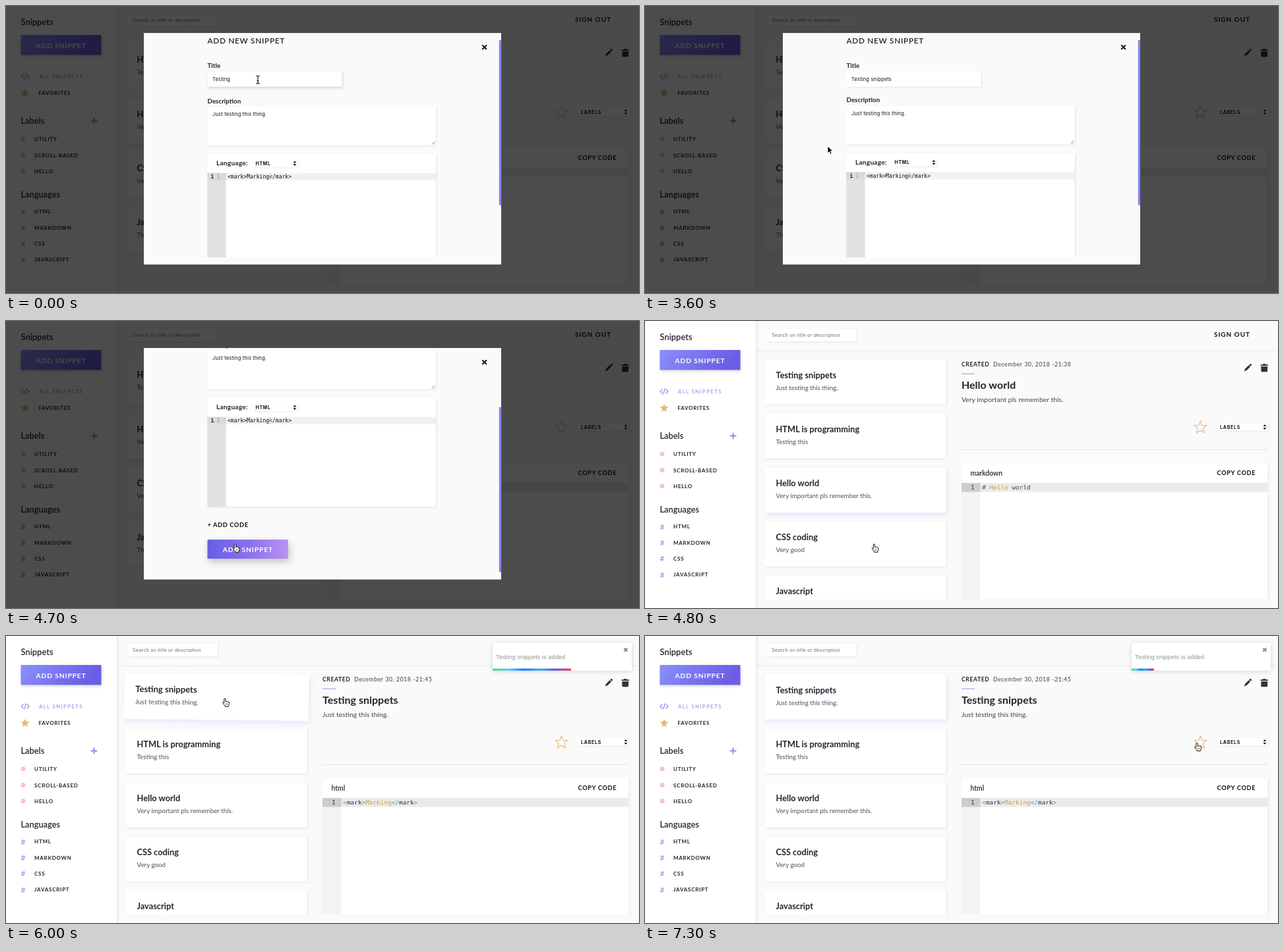
An HTML page for the animation above (7400 ms loop, 960 px wide and 436 px high).

```html
<!DOCTYPE html>
<html lang="en">
<head>
<meta charset="utf-8">
<title>Snippets</title>
<style>
html, body { margin: 0; width: 100%; height: 100%; overflow: hidden; background: #fafafa; }
svg { display: block; width: 100vw; height: 100vh; }
text { font-family: Lato, "Open Sans", sans-serif; white-space: pre; }
.b { font-weight: 700; }
.m { font-weight: 600; }
.ui { font-family: Inter, Roboto, sans-serif; }
.arial { font-family: "Liberation Sans", Arial, sans-serif; }
.code { font-family: "DejaVu Sans Mono", "Noto Sans Mono", monospace; }
.sh { filter: drop-shadow(1px 1.5px 1.5px rgba(0,0,0,.09)); }
.focus { filter: drop-shadow(1px 2px 2px rgba(0,0,0,.16)); }
.picked { filter: drop-shadow(2px 3px 3.5px rgba(120,110,240,.15)); }
.glow { filter: drop-shadow(2px 5px 6px rgba(0,0,0,.22)); }
.side { filter: drop-shadow(1px 0 1.5px rgba(0,0,0,.12)); }
.top { filter: drop-shadow(0 1px 1.5px rgba(0,0,0,.07)); }
.float { filter: drop-shadow(0 1px 3px rgba(0,0,0,.16)); }
</style>
</head>
<body>
<svg id="stage" viewBox="0 0 960 436" xmlns="http://www.w3.org/2000/svg"></svg>
<script>
const LOOP = 7400;
const INK = '#25232f', PURPLE = '#8d88ee', GOLD = '#eab676';
const BLUR = 3450, CLOSE = 4800, PICK = 5900;

const esc = s => s.replace(/&/g, '&amp;').replace(/</g, '&lt;');
const text = (x, y, s, size, cls = '', fill = INK, gap = 0, id = '') =>
  `<text x="${x}" y="${y}" font-size="${size}" class="${cls}" style="fill:${fill};letter-spacing:${gap}px"${id && ` id="${id}"`}>${esc(s)}</text>`;
const rect = (x, y, w, h, fill, more = '') =>
  `<rect x="${x}" y="${y}" width="${w}" height="${h}" fill="${fill}" ${more}/>`;
const path = (d, fill, more = '') => `<path d="${d}" fill="${fill}" ${more}/>`;
const line = (d, stroke, width, more = '') =>
  `<path d="${d}" fill="none" stroke="${stroke}" stroke-width="${width}" ${more}/>`;
const sh = 'class="sh"';

function star(cx, cy, r) {
  const pts = [];
  for (let i = 0; i < 10; i++) {
    const a = i * Math.PI / 5 - Math.PI / 2, k = i % 2 ? r * .45 : r;
    pts.push((cx + k * Math.cos(a)).toFixed(2) + ' ' + (cy + k * Math.sin(a)).toFixed(2));
  }
  return 'M' + pts.join('L') + 'Z';
}

const select = (x, y, w, label, gap) =>
  rect(x, y - 5.5, w, 11, '#fff', sh) +
  text(x + 3.5, y + 2.6, label, 6.9, 'ui b', '#111', gap) +
  path(`M${x + w - 7} ${y - .9}l2.4 -3 2.4 3zM${x + w - 7} ${y + .9}l2.4 3 2.4 -3z`, '#111');

// Fixed parts of the page
const menu = (y, label) => text(43, y + 3, label, 8, 'b', INK, .73);

const sidebar = () =>
  rect(0, -5, 168.3, 446, '#fff', 'class="side"') +
  text(22.5, 28.5, 'Snippets', 12.9, 'm') +
  rect(22.5, 44, 122, 30.3, 'url(#btn)', 'class="focus"') +
  text(45.5, 64, 'ADD SNIPPET', 10.3, 'b', '#fff', .85) +
  line('M26.5 103.5l-3.5 3.5 3.5 3.5M31.5 103.5l3.5 3.5 -3.5 3.5M30.3 102.5l-2.6 9', PURPLE, 1.1) +
  text(50, 109.6, 'ALL SNIPPETS', 8, 'm', '#a29cea', 1.25) +
  path(star(29, 132.6, 6.8), GOLD) +
  text(49.5, 135.4, 'FAVORITES', 8, 'b', INK, .7) +
  text(22.5, 179, 'Labels', 12.8, 'm') +
  line('M128.8 174.5h9.6M133.6 169.7v9.6', PURPLE, 2) +
  ['UTILITY', 'SCROLL-BASED', 'HELLO'].map((s, i) =>
    `<circle cx="26" cy="${202 + i * 24.4}" r="3.5" fill="#f3c3d1"/>` + menu(202.2 + i * 24.4, s)).join('') +
  text(22.5, 291.3, 'Languages', 12.8, 'm') +
  ['HTML', 'MARKDOWN', 'CSS', 'JAVASCRIPT'].map((s, i) =>
    text(22.5, 316.6 + i * 24.4, '#', 12, '', PURPLE) + menu(312.1 + i * 24.4, s)).join('');

const header = () =>
  rect(168, -6, 800, 50, '#fafafa', 'class="top"') +
  rect(185, 12, 136, 19, '#fff', sh) +
  text(192, 24.3, 'Search on title or description', 7.2, 'ui', '#6c6c6c', .2) +
  text(863, 24.4, 'SIGN OUT', 10, 'b', '#111', .95);

const NOTES = [
  ['Testing snippets', 'Just testing this thing.'],
  ['HTML is programming', 'Testing this'],
  ['Hello world', 'Very important pls remember this.'],
  ['CSS coding', 'Very good'],
  ['Javascript', 'This is a language']
];
const PITCH = 82.2;
const list = () => NOTES.map(([title, note], i) => {
  const y = 58.5 + i * PITCH;
  return `<g id="card${i}">` + rect(182, y, 274.5, 68.3, '#fff', `id="face${i}" class="sh"`) +
    text(198.5, y + 28, title, 12.8, 'b') + text(198.5, y + 46, note, 9.8, '', '#50505a') + '</g>';
}).join('');

const detail = () =>
  text(480, 68.5, 'CREATED', 8.6, 'b', INK, .6) +
  text(528, 68.5, '', 9, '', '#44444e', .45, 'date') +
  rect(480, 79.5, 20, 1.4, '#b5b0f0') +
  text(480, 102.5, '', 16, 'b', INK, 0, 'head') +
  text(480, 122.7, '', 10.4, '', '#44444e', 0, 'note') +
  '<g transform="translate(913.6 71.5) rotate(45) scale(.85 .9)">' +
  path('M-2 -5.2h4v9l-2 4 -2 -4zM-2 -8q0 -1.2 1.2 -1.2h1.6q1.2 0 1.2 1.2v1.8h-4z', '#333') + '</g>' +
  path('M933.5 66.3h3.2l1 -1.2h3l1 1.2h3.2v1.6h-11.4zM934.3 69h9.8v6.8q0 1.4 -1.4 1.4h-7q-1.4 0 -1.4 -1.4z', '#333') +
  line(star(842.3, 161.8, 9.8), GOLD, 1.1) +
  select(868.5, 161, 76, 'LABELS', .8) +
  line('M480 195.3H944.5', '#d4d4d4', .9, 'stroke-dasharray="2 1"') +
  rect(480, 216, 464.5, 206.7, '#fff', sh) +
  rect(480, 246, 28.5, 176.7, '#f3f3f1') + rect(508.5, 246, 436, 13.7, '#ebebeb') +
  rect(480, 246, 28.5, 13.7, '#cdcdcd') +
  text(493.5, 234.5, '', 10.4, 'm', INK, 0, 'lang') +
  text(867.5, 233.8, 'COPY CODE', 9.3, 'b', '#111', .65) +
  text(494, 256.2, '1', 9.4, 'code', '#333') +
  '<text x="511.3" y="256.2" font-size="9.4" class="code" id="code"></text>';

const toast = () =>
  rect(738, 10, 211, 42.6, '#fff', 'class="float"') +
  text(743, 34.6, 'Testing snippets is added', 9.4, 'arial', '#949494') +
  line('M937.4 18.4l5 5M942.4 18.4l-5 5', '#8a8a8a', 2.1) +
  rect(738, 49.5, 211, 3.1, 'url(#rainbow)', 'id="bar"');

const modal = () =>
  rect(0, 0, 960, 436, '#000', 'opacity=".7"') +
  rect(209, 41, 542, 351.7, '#fafafa') +
  '<g clip-path="url(#view)"><g id="form">' +
  text(305.5, 56.7, 'ADD NEW SNIPPET', 11.8, 'm', INK, .7) +
  text(305.5, 94.3, 'Title', 9.8, 'b') +
  rect(305.5, 99, 204, 23.6, '#fff', 'id="input"') +
  text(313, 113.7, '', 7.5, 'ui', '#111', .18, 'typed') +
  rect(0, 106.3, .9, 9, '#111', 'id="caret"') +
  '<g id="rest">' +
  text(305.5, 147.8, 'Description', 9.8, 'b') +
  rect(305.5, 153, 346.5, 58.7, '#fff', sh) +
  text(313, 167.2, 'Just testing this thing.', 7.5, 'ui', '#111', .18) +
  line('M645.5 210.5l5 -5M648.3 210.5l2.2 -2.2', '#777', .8) +
  rect(305.5, 225, 346.5, 165, '#fff', sh) +
  text(319, 242.4, 'Language:', 10.2, 'b', INK, .2) +
  select(375, 239.2, 67.5, 'HTML', .75) +
  rect(305.5, 253.7, 28, 136.3, '#e1e1e1') +
  rect(333.5, 253.7, 318.5, 11, '#f1f1f1') + rect(305.5, 253.7, 28, 11, '#dadada') +
  text(310.5, 262.2, 'i', 8, 'code b', '#222') +
  text(319.5, 262.2, '1', 8, 'code', '#999') +
  text(336, 262.2, '<mark>Marking</mark>', 8.07, 'code', '#111') +
  rect(399.8, 254, .8, 10.4, '#aaa') +
  text(305.5, 421.3, '+ ADD CODE', 9.4, 'b', '#111', .55) +
  rect(305.5, 440, 122.3, 29, 'url(#hover)', 'class="glow"') +
  text(328.8, 458.6, 'ADD SNIPPET', 10.3, 'b', '#fff', .85) +
  '</g></g></g>' +
  rect(747.8, 52, 3.4, 250.5, '#8383f0', 'id="thumb"') +
  line('M722.3 59.3l6.6 6.6M728.9 59.3l-6.6 6.6', '#000', 1.9);

// Pointer shapes, hot spot at 0,0
const pointers = () =>
  '<g id="beam">' + line('M-2.8 -6q2.8 0 2.8 1.6v9q0 1.6 -2.8 1.6M2.8 -6q-2.8 0 -2.8 1.6M0 4.6q0 1.6 2.8 1.6M-1.4 1.6h2.8', '#111', 1.1) + '</g>' +
  '<g id="arrow">' + path('M0 0V10.6l2.5 -2.3 1.7 4 1.9 -.8 -1.7 -3.9h3.4z', '#000', 'stroke="#fff" stroke-width=".8"') + '</g>' +
  '<g id="hand">' + path('M-1.2 1q0 -1.2 1.1 -1.2T1.2 1v3.6q.8 -.8 1.7 .1 .9 -.7 1.8 .3 1.6 -.5 1.7 1.2v2.4l-1 2.2v1.4h-5.2v-1.2l-3.1 -3.5q-.9 -1.4 .2 -1.7 .8 -.1 1.5 1z', '#fff', 'stroke="#111" stroke-width="1" stroke-linejoin="round"') +
  line('M1.6 7.2v2.6M3.4 7.2v2.6', '#111', .6) + '</g>';

const ramp = (id, colors, tilt = 0) =>
  `<linearGradient id="${id}" x2="1" y2="${tilt}">` +
  colors.map((c, i) => `<stop offset="${i / (colors.length - 1)}" stop-color="${c}"/>`).join('') + '</linearGradient>';

const stage = document.getElementById('stage');
stage.innerHTML = '<defs>' +
  ramp('btn', ['#8a90fa', '#6a5ce4'], .2) + ramp('hover', ['#665fe6', '#8a70ee', '#bb90f2']) +
  ramp('rainbow', ['#4cd964', '#5ac8fa', '#007aff', '#34aadc', '#5856d6', '#ff2d55']) +
  '<clipPath id="view"><rect x="209" y="41" width="542" height="341"/></clipPath>' +
  '<clipPath id="page"><rect x="168" y="44" width="792" height="379"/></clipPath></defs>' +
  rect(0, 0, 960, 436, '#fafafa') +
  `<g clip-path="url(#page)"><g id="list">${list()}</g>${detail()}</g>` + header() + sidebar() +
  `<g id="toast">${toast()}</g><g id="modal">${modal()}</g><g id="pointer">${pointers()}</g>`;

const el = {};
stage.querySelectorAll('[id]').forEach(n => el[n.id] = n);
const show = (n, on) => n.style.display = on ? '' : 'none';
const move = (n, x, y) => n.setAttribute('transform', `translate(${x} ${y})`);

// Value at t from [time, value] keys
function key(t, keys, smooth = true) {
  if (t <= keys[0][0]) return keys[0][1];
  for (let i = 1; i < keys.length; i++) {
    const [t1, b] = keys[i], [t0, a] = keys[i - 1];
    if (t < t1) {
      const u = (t - t0) / (t1 - t0);
      return a + (b - a) * (smooth ? u * u * (3 - 2 * u) : u);
    }
  }
  return keys[keys.length - 1][1];
}

const MOUSE = [[3000, 382, 112], [3500, 277, 213], [3750, 277, 213], [4500, 347.5, 339], [4900, 347.5, 339],
  [5500, 338, 135.5], [5750, 332, 95], [6050, 332, 95], [6600, 654, 153.5], [7150, 837, 162.5]];
const mouseX = MOUSE.map(([t, x]) => [t, x]), mouseY = MOUSE.map(([t, , y]) => [t, y]);

// Hover tilt of each card: rise, hold, fall
const TILT = [[5650, 5800, 6400, 6800], [5350, 5480, 5550, 5900], [5150, 5270, 5330, 5560], [4900, 5000, 5100, 5400]];
const PEAK = [.02, .02, .012, .012];

const DOCS = [
  { date: 'December 30, 2018 -21:38', row: 2, lang: 'markdown', code: [['# ', '#555'], ['Hello', '#d79a35'], [' world', '#444']] },
  { date: 'December 30, 2018 -21:45', row: 0, lang: 'html', code: [['<', '#4b90b5'], ['mark', '#333'], ['>', '#4b90b5'],
    ['Marking', '#d79a35'], ['</', '#4b90b5'], ['mark', '#333'], ['>', '#4b90b5']] }
];
let shown = null;
function open(doc) {
  if (shown === doc) return;
  shown = doc;
  el.date.textContent = doc.date;
  [el.head.textContent, el.note.textContent] = NOTES[doc.row];
  el.lang.textContent = doc.lang;
  el.code.innerHTML = doc.code.map(([s, c]) => `<tspan fill="${c}">${esc(s)}</tspan>`).join('');
  NOTES.forEach((_, i) => el['face' + i].setAttribute('class', i === doc.row ? 'picked' : 'sh'));
}

function drawForm(t) {
  const count = t < 750 ? 0 : Math.min(9, 1 + Math.floor((t - 750) / 230));
  const focused = t < BLUR;
  el.typed.textContent = 'Testing snippets'.slice(0, 7 + count);
  const typing = t >= 750 && t < 2900;
  show(el.caret, focused && (typing || Math.floor(t / 400) % 2 === 1));
  el.caret.setAttribute('x', 313.2 + el.typed.getComputedTextLength());
  el.input.setAttribute('class', focused ? 'focus' : 'sh');
  const scroll = key(t, [[3750, 0], [4350, 106.4]]);
  move(el.form, 0, -scroll);
  move(el.rest, 0, focused ? 0 : -1.5);
  move(el.thumb, 0, scroll * 79 / 106.4);
}

function drawPage(t) {
  const added = t >= CLOSE;
  open(DOCS[t < PICK ? 0 : 1]);
  show(el.card0, added);
  move(el.list, 0, added ? 0 : -PITCH);
  TILT.forEach(([a, b, c, d], i) => {
    const k = key(t, [[a, 0], [b, 1], [c, 1], [d, 0]]) * PEAK[i];
    const cy = 92.6 + i * PITCH;
    el['card' + i].setAttribute('transform',
      `translate(319 ${cy}) rotate(${k * 32}) scale(${1 + k}) translate(-319 ${-cy})`);
  });
  show(el.toast, added);
  move(el.toast, key(t, [[4800, 240], [5100, -25], [5180, 10], [5250, -5], [5300, 0]]), 0);
  el.bar.setAttribute('width', key(t, [[4700, 211], [5500, 154], [6600, 77], [7300, 34]], false));
}

function drawPointer(t) {
  show(el.pointer, t < 750 || t >= 3000);
  const kind = t < 3350 ? 'beam' : t < 4450 ? 'arrow' : t < 6250 ? 'hand' : t < 7000 ? 'arrow' : 'hand';
  ['beam', 'arrow', 'hand'].forEach(k => show(el[k], k === kind));
  move(el.pointer, key(t, mouseX), key(t, mouseY));
}

function draw(t) {
  show(el.modal, t < CLOSE);
  drawForm(t);
  drawPage(t);
  drawPointer(t);
}

const start = performance.now();
function tick() {
  draw((performance.now() - start) % LOOP);
  requestAnimationFrame(tick);
}
tick();
</script>
</body>
</html>
```
